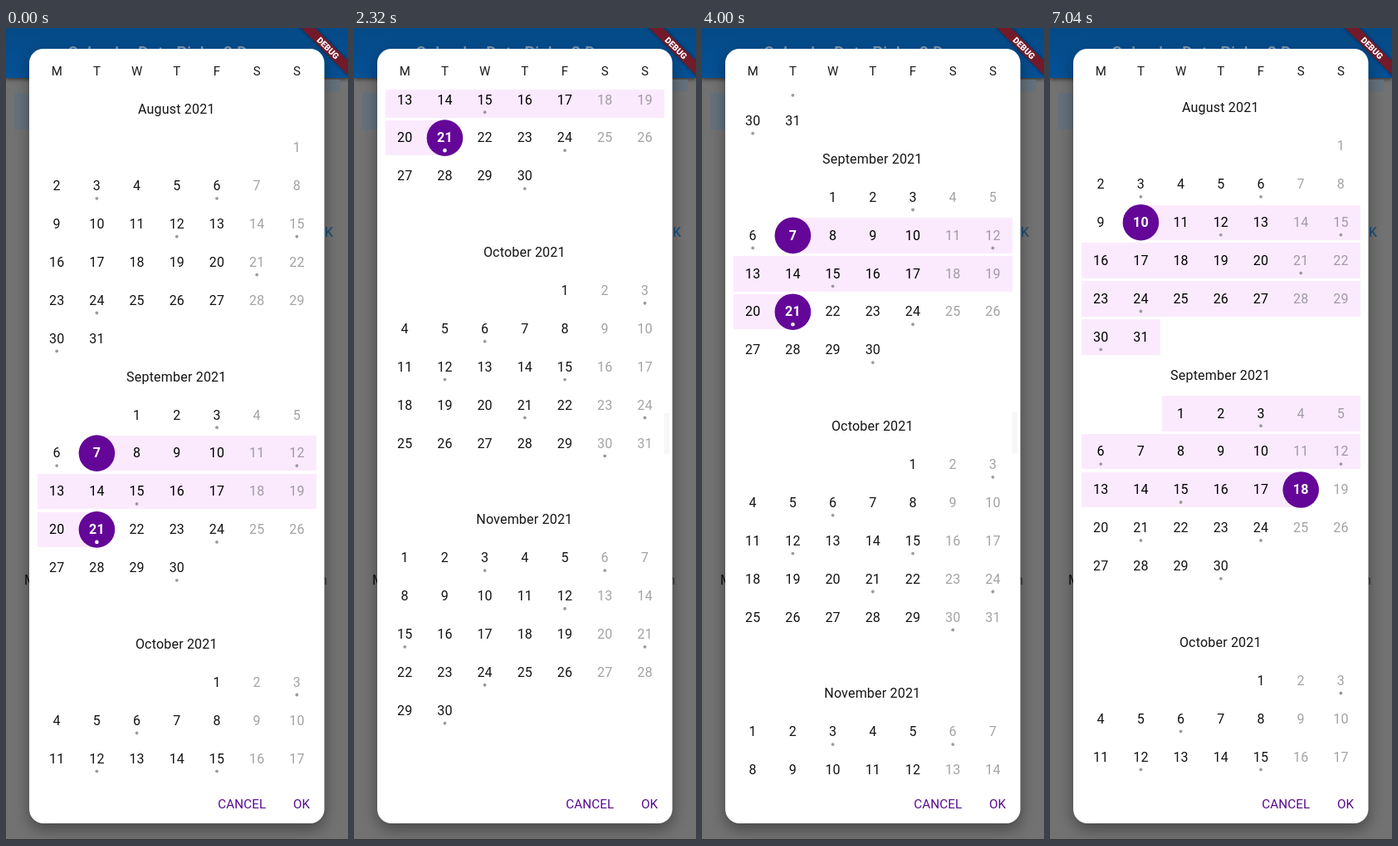
These frames come from a looping animation (412x976 px, 7.2 s). An HTML page:

```html
<!DOCTYPE html>
<html lang="en">
<head>
<meta charset="utf-8">
<title>Date range picker</title>
<style>
html, body { margin: 0; width: 100%; height: 100%; overflow: hidden; background: #707070; }
svg { display: block; width: 412px; height: 976px; font: 16px Roboto, sans-serif; }
.mid, #list text { text-anchor: middle; }
#list { letter-spacing: .15px; fill: #141414; }
#list .head { letter-spacing: .2px; }
#list .off { fill: #a3a3a3; }
#list .in { fill: #000; }
#list .in.off { fill: #a09aa4; }
#list .hot { font-weight: 500; fill: #999; }
#list .picked { font-weight: 700; fill: #fff; }
#list rect { fill: #fbeafe; shape-rendering: crispEdges; }
.btn { font-size: 15.2px; letter-spacing: .1px; fill: #560a8c; }
</style>
</head>
<body>
<svg viewBox="0 0 412 976">
  <defs>
    <clipPath id="view"><rect x="28" y="74" width="356" height="829"/></clipPath>
    <linearGradient id="bar" x2="0" y2="1">
      <stop stop-color="#044a86"/><stop offset="1" stop-color="#055196"/>
    </linearGradient>
    <filter id="soft" x="-20%" y="-20%" width="140%" height="140%"><feGaussianBlur stdDeviation="9"/></filter>
    <filter id="blur" x="-20%" y="-60%" width="140%" height="220%"><feGaussianBlur stdDeviation="2"/></filter>
  </defs>
  <rect width="412" height="976" fill="#727272"/>
  <rect y="2" width="412" height="60" filter="url(#blur)" opacity=".5"/>
  <rect width="412" height="60" fill="url(#bar)"/>
  <text x="74" y="37" font-size="20" font-weight="500" fill="#7f9cb6">Calendar Date Picker2 Demo</text>
  <path d="M10 78H40V122H10zM370 62H402V76H370z" fill="#65717c"/>
  <text x="384" y="250.5" fill="#0d4a7d">K</text>
  <text x="22" y="669" fill="#111">M</text>
  <text x="378" y="669" fill="#333">n</text>
  <rect y="975" width="412" height="1" fill="#303030"/>
  <rect x="28" y="32" width="356" height="931" rx="17" filter="url(#soft)" opacity=".38"/>
  <rect x="28" y="25" width="355.5" height="931" rx="17" fill="#fff"/>
  <g id="week" class="mid" font-size="15" fill="#1c1c1c"></g>
  <g clip-path="url(#view)"><g id="list"></g></g>
  <rect id="thumb" x="373.5" width="6.5" height="49" opacity=".03"/>
  <text class="btn" x="255.3" y="938.3">CANCEL</text>
  <text class="btn" x="346" y="938.3">OK</text>
  <circle id="touch" cx="283" cy="551.5" r="4" fill="#a9d3f3"/>
  <g transform="translate(412 0) rotate(45)">
    <rect x="-42" y="28" width="84" height="12" filter="url(#blur)" opacity=".5"/>
    <rect x="-60" y="28" width="120" height="12" fill="#731a2a"/>
    <text class="mid" y="37.7" font-size="10.2" font-weight="900" fill="#fff">DEBUG</text>
  </g>
</svg>
<script>
const LOOP = 7200, STEP = 80, ROW = 45.9, TOP = 98;
const PICK = 5040, PRESS = 5600, DONE = 5920;
// name, first weekday column, length
const months = [['August', 6, 31], ['September', 2, 30], ['October', 4, 31], ['November', 0, 30], ['December', 2, 31]];
const marked = new Set([3, 6, 12, 15, 21, 24, 30]);
// time, scroll offset
const path = [[0, 0], [160, 4], [240, 4], [1040, 45], [1840, 197.5], [2880, 744], [3120, 752], [3680, 574.6], [4320, 14], [4720, 2]];

const $ = id => document.getElementById(id);
const colX = c => 61.2 + 48.2 * c;
const key = (m, d) => m * 100 + d;
const label = (x, y, text, cls = '') => `<text x="${x}" y="${y + 5.3}" class="${cls}">${text}</text>`;
const disc = (x, y, r, fill) => `<circle cx="${x}" cy="${y}" r="${r}" fill="${fill}"/>`;

$('week').innerHTML = [...'MTWTFSS'].map((s, c) => label(colX(c), 51.7, s)).join('');

// Monotone cubic through the scroll path
const slopes = path.slice(1).map((p, i) => (p[1] - path[i][1]) / (p[0] - path[i][0]));
const tangents = path.map((_, i) => {
  const a = slopes[i - 1] || 0, b = slopes[i] || 0;
  return a * b > 0 ? 2 * a * b / (a + b) : 0;
});
function scrollAt(t) {
  const i = path.findIndex(p => p[0] > t) - 1;
  if (i < 0) return path[path.length - 1][1];
  const [t0, y0] = path[i], [t1, y1] = path[i + 1], h = t1 - t0, u = (t - t0) / h;
  const s = u * u * (3 - 2 * u);
  return y0 + (y1 - y0) * s + h * u * (1 - u) * (tangents[i] * (1 - u) - tangents[i + 1] * u);
}

function drawList(from, to, hot) {
  let bands = '', marks = '';
  months.forEach(([name, first, count], m) => {
    const head = TOP + m * 7 * ROW;
    marks += label(205.3, head, name + ' 2021', 'head');
    for (let d = 1; d <= count; d++) {
      const cell = first + d - 1, col = cell % 7;
      const x = colX(col), y = head + ROW * (1 + Math.floor(cell / 7)), k = key(m, d);
      const picked = k === from || k === to, inside = k >= from && k <= to && from < to;
      if (inside) {
        const left = k === from ? x : x - 23, right = k === to ? x : x + (col < 6 && d < count ? 25.3 : 23.6);
        bands += `<rect x="${left}" y="${y - 21.2}" width="${right - left}" height="42.5"/>`;
      }
      if (k === hot) marks += disc(x, y, 26, '#f8f8f8');
      if (picked) marks += disc(x, y, 21.8, '#640798');
      const cls = picked ? 'picked' : k === hot ? 'hot' : (inside ? 'in ' : '') + (col > 4 ? 'off' : '');
      marks += label(x, y, d, cls);
      if (marked.has(d)) marks += disc(x, y + 15, picked ? 2.3 : 1.9, picked ? '#fff' : '#9b9b9b');
    }
  });
  $('list').innerHTML = bands + marks;
}

const start = key(0, 10), end = key(1, 18);
const phases = [
  [0, key(1, 7), key(1, 21)],
  [PICK, start, start],
  [PRESS, start, start, end],
  [DONE, start, end]
];
let shown;

function render(t) {
  const phase = phases.filter(p => p[0] <= t).pop();
  if (phase !== shown) drawList(...phase.slice(1));
  shown = phase;
  const offset = scrollAt(t);
  $('list').setAttribute('transform', `translate(0 ${-offset})`);
  $('thumb').setAttribute('y', 461 + offset * .0035);
  $('thumb').style.display = t >= 320 && t < 5200 ? '' : 'none';
  $('touch').style.display = t >= PRESS && t < DONE ? '' : 'none';
}

const began = performance.now();
function tick() {
  const t = (performance.now() - began) % LOOP;
  render(Math.floor(t / STEP) * STEP);
  requestAnimationFrame(tick);
}
tick();
</script>
</body>
</html>
```
